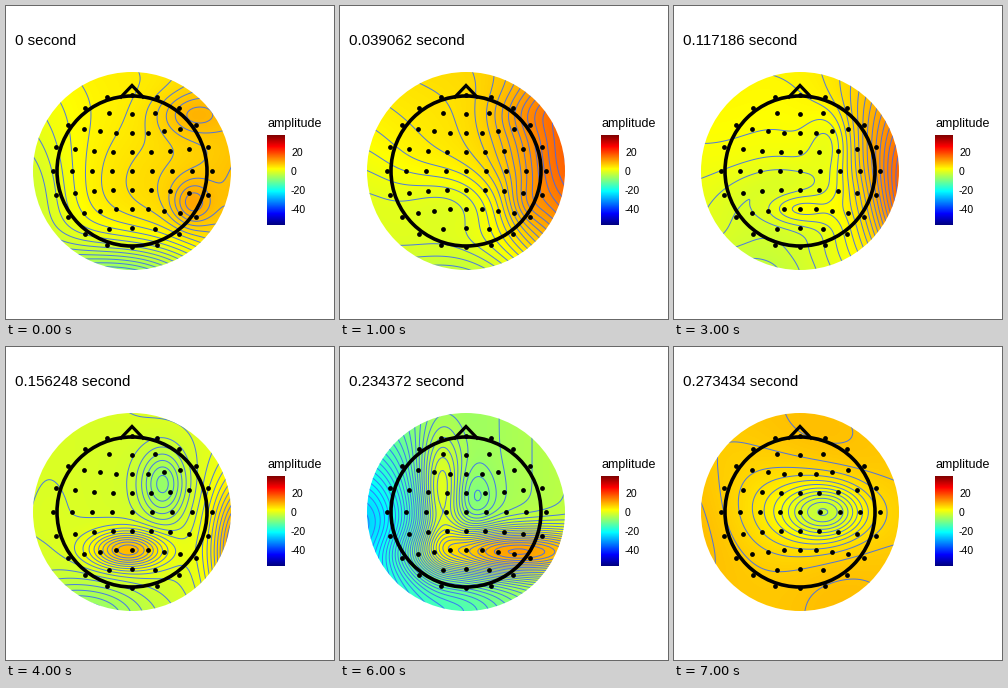
These frames come from a looping animation (328 by 313 pixels, 8 s). A matplotlib script:

```python
import numpy as np
import matplotlib.pyplot as plt
from matplotlib.animation import FuncAnimation
from matplotlib.colors import LinearSegmentedColormap
from matplotlib.patches import Circle

W, H, DPI = 328, 313, 100
CX, CY, R_FIELD, R_HEAD, R_SITE = 126, 165, 99, 75, 79.5
VMIN, VMAX = -57, 38
SECONDS = 0.039062

plt.rcParams["font.family"] = "Liberation Sans"
JET = LinearSegmentedColormap.from_list("jet_dark", [
    "#00007F", "#0000FF", "#007FFF", "#00FFFF", "#7FFF7F",
    "#FFFF00", "#FF7F00", "#FF0000", "#7F0000"], N=512)

grid = np.arange(-R_FIELD - 2, R_FIELD + 3, 2.0)
X, Y = np.meshgrid(CX + grid, CY + grid)
U, V = (X - CX) / R_FIELD, (Y - CY) / R_FIELD


def bump(x, y, w, h):
    return np.exp(-((X - x) / w) ** 2 / 2 - ((Y - y) / h) ** 2 / 2)


def ripple(seed, size):
    """Smooth random waves that make the contours wander."""
    rng = np.random.default_rng(seed)
    total = 0
    for _ in range(6):
        a, b, phase = rng.uniform(-4.5, 4.5, 2).tolist() + [rng.uniform(0, 2 * np.pi)]
        total = total + np.sin(a * U + b * V + phase)
    return size * total / 3


# Scalp potentials: a base level, a slope and a few sources
calm = (4.5 + 3 * U - 14 * bump(115, 285, 70, 32) - 4 * bump(20, 190, 35, 45)
        + 4 * bump(186, 198, 14, 16) + 4 * bump(186, 108, 26, 17) + ripple(1, 0.9))
rise = (4 - 3 * V - 8 * bump(112, 200, 45, 26)
        + 23 * bump(240, 150, 46, 80) + ripple(2, 0.4))
dipole = (-1 + 10 * bump(122, 203, 26, 13) - 6 * bump(157, 137, 16, 24)
          + 14 * bump(240, 205, 24, 55) - 7 * bump(75, 270, 50, 24) + ripple(3, 0.4))
bowl = (24 - 5 * U - 19 * bump(126, 165, 50, 40)
        - 6 * bump(195, 110, 45, 40) - 2.5 * bump(108, 175, 20, 14))
hook = (-7 + 3 * U + 9 * bump(100, 145, 16, 45) + 17 * bump(170, 205, 65, 17)
        - 16 * bump(20, 185, 40, 60) - 7 * bump(110, 265, 60, 25)
        - 3 * bump(135, 150, 14, 20))
dip = (7.8 - 7 * bump(153, 165, 26, 18) - 4.5 * bump(132, 165, 45, 32)
       + ripple(4, 0.7))

fields = [calm, (calm + rise) / 2, rise, (rise + dipole) / 2,
          dipole, bowl, hook, dip]

fig = plt.figure(figsize=(W / DPI, H / DPI), dpi=DPI, facecolor="white")
ax = fig.add_axes([0, 0, 1, 1])
ax.axis("off")


def px(n):
    return n * 72 / DPI


def label(x, y, s, size):
    return ax.text(x, y, s, fontsize=px(size), color="black", va="baseline")


def image(data, box):
    return ax.imshow(data, extent=box, cmap=JET, vmin=VMIN, vmax=VMAX,
                     aspect="auto", interpolation="bilinear")


def electrodes():
    """Rows of sites bending out to the rim, mirrored into four quadrants."""
    sites = set()
    for row, steps in enumerate((4, 4, 4, 2, 1)):
        angle = np.radians(18 * row)
        end_x, end_y = R_SITE * np.cos(angle), 77.5 * np.sin(angle)
        for k in range(steps + 1):
            t = k / steps
            x, y = t * end_x, 19 * row + t * t * (end_y - 19 * row)
            sites |= {(CX + i * x, CY + j * y) for i in (-1, 1) for j in (-1, 1)}
    return sorted(sites)


heat = image(calm, (X[0, 0] - 1, X[0, -1] + 1, Y[-1, 0] + 1, Y[0, 0] - 1))
image(np.linspace(VMAX, VMIN, 256)[:, None], (261, 279, 219, 129))
ax.set_xlim(0, W)
ax.set_ylim(H, 0)
disc = Circle((CX, CY), R_FIELD, transform=ax.transData)
heat.set_clip_path(disc)

# Head, nose and electrodes
ax.add_patch(Circle((CX, CY), R_HEAD, fill=False, lw=px(3.6), ec="black", zorder=4))
ax.plot([CX - 11, CX, CX + 11], [91, 79.5, 91], color="black", lw=px(3.2),
        solid_joinstyle="miter", zorder=4)
ax.plot(*zip(*electrodes()), "o", ms=px(4.8), mew=0, color="black", zorder=5)

# Legend
label(261, 121.5, "amplitude", 12.5)
for v in range(20, -41, -20):
    y = 129 + 90 * (VMAX - v) / (VMAX - VMIN)
    label(285, y + 3.8, str(v), 10.5)

title = label(9, 39, "", 15)
lines = []


def draw(i):
    while lines:
        lines.pop().remove()
    z = fields[i]
    heat.set_data(z)
    cs = ax.contour(X, Y, z, levels=np.arange(np.floor(z.min()), z.max() + 1),
                    colors="#3366FF", alpha=0.85, linewidths=px(1),
                    linestyles="solid", zorder=3)
    cs.set_clip_path(disc)
    lines.append(cs)
    title.set_text(f"{round(i * SECONDS, 6):g} second")
    return [heat, cs, title]


anim = FuncAnimation(fig, draw, frames=len(fields), init_func=lambda: [],
                     interval=1000, repeat=True, repeat_delay=0, blit=False)
plt.show()
```
